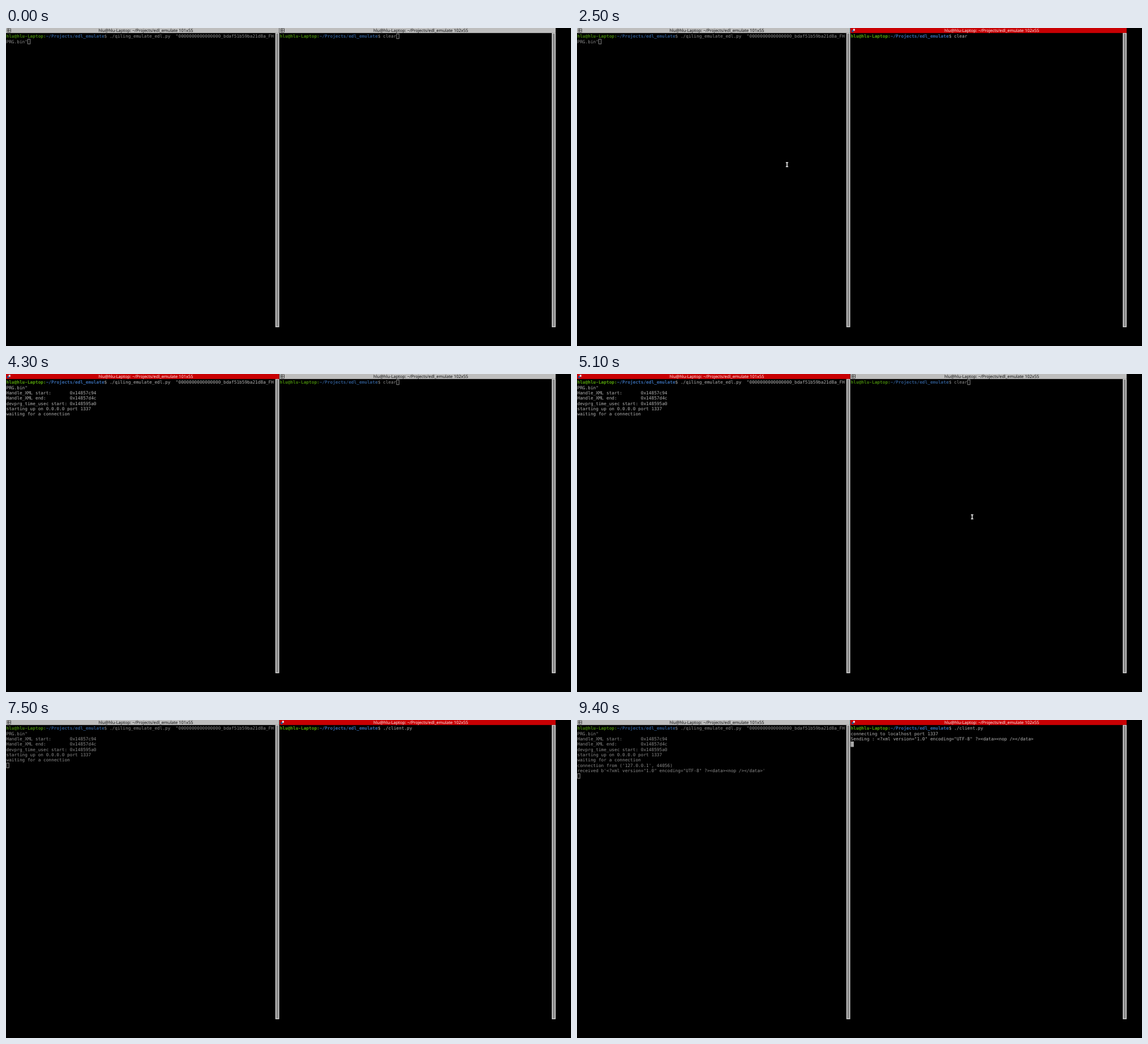
An HTML page for the animation above (10000 ms loop, 998x561 px).

```html
<!DOCTYPE html>
<html lang="en">
<head>
<meta charset="utf-8">
<title>Two terminals</title>
<style>
html, body { margin: 0; width: 100%; height: 100%; overflow: hidden; background: #000; }
/* The desktop is laid out at 1920 x 1080 and shown at 52 %. */
#desktop { position: absolute; left: 0; top: 0; width: 1920px; height: 1080px;
  transform: scale(.52); transform-origin: 0 0; text-rendering: geometricPrecision; }
.pane { position: absolute; top: 0; height: 1015px;
  --fg: #8c8c8c; --user: #43830a; --path: #2d568a; --bar: #bebebe; --title: #000; }
.pane.active { --fg: #b4b4b4; --user: #56a60a; --path: #386cb0; --bar: #c80003; --title: #fff; }
.bar { position: absolute; left: 0; right: 0; top: 0; height: 17px; background: var(--bar);
  color: var(--title); font: 14.4px/17px "Open Sans", "Noto Sans", sans-serif;
  text-align: center; white-space: pre; }
.bar span { position: relative; left: 11px; }
.bar svg { position: absolute; left: 3px; top: 1px; }
.pane .on, .pane.active .off { display: none; }
.pane.active .on { display: inline; }
pre { position: absolute; left: 1px; top: 19px; margin: 0; color: var(--fg);
  font: 14.95px/18px "DejaVu Sans Mono", monospace; }
b:first-child { color: var(--user); }
b + b { color: var(--path); }
.cursor { position: absolute; box-sizing: border-box; width: 10px; height: 18px;
  border: 2px solid #858585; }
.active .cursor { background: #aaa; border-color: #aaa; }
.scroll { position: absolute; right: 0; top: 17px; bottom: 0; width: 13px; background: #d2d2d2; }
.scroll::after { content: ""; position: absolute; left: 3px; right: 3px; top: 2px; bottom: 3px;
  background: #858585; }
#pointer { position: absolute; left: -6px; top: -9px; }
</style>
</head>
<body>
<div id="desktop">
  <svg id="pointer" width="12" height="18" viewBox="-6 -9 12 18" fill="none">
    <path d="M-4-7H4M-4 7H4M0-7V7" stroke="#444" stroke-width="4.5"/>
    <path d="M-4-7H4M-4 7H4M0-7V7" stroke="#fff" stroke-width="2.4"/>
  </svg>
</div>
<script>
const LOOP = 10000, CELL = 9, ROW = 18;
const USER = "hlu@hlu-Laptop", PATH = "~/Projects/edl_emulate";
const XML = '<?xml version="1.0" encoding="UTF-8" ?><data><nop /></data>';
const desktop = document.getElementById("desktop");
const pointer = document.getElementById("pointer");

const command = './qiling_emulate_edl.py  "0000000000000000_bdaf51b59ba21d8a_FH\nPRG.bin"';
const hooks = command + "\n" + [
  "Handle_XML start:       0x14857c94",
  "Handle_XML end:         0x14857d4c",
  "devprg_time_usec start: 0x148595a0", ""].join("\n");
const waiting = hooks + "starting up on 0.0.0.0 port 1337\nwaiting for a connection\n";
const connected = waiting + "connection from ('127.0.0.1', 44056)\n";
const client = "./client.py ";
const connecting = client + "\nconnecting to localhost port 1337\n";

// Each step lists only what changes; blink is the focused cursor's visibility.
const steps = [
  [0, { focus: "", blink: true, left: command, right: "clear" }],
  [300, { focus: "right" }],
  [900, { blink: false }],
  [1500, { blink: true }],
  [2100, { blink: false }],
  [2600, { focus: "left", blink: true }],
  [3300, { blink: false }],
  [3400, { blink: true, left: command + "\n" }],
  [3700, { left: hooks }],
  [3900, { left: waiting, blink: false }],
  [4500, { blink: true }],
  [5100, { blink: false }],
  [5500, { focus: "right", blink: true }],
  [6100, { blink: false }],
  [6700, { blink: true }],
  [6900, { right: client }],
  [7500, { blink: false }],
  [8100, { blink: true }],
  [8200, { right: connecting, left: connected }],
  [8300, { right: connecting + `Sending : ${XML}\n`, left: connected + `received b'${XML}'\n` }],
  [8800, { blink: false }],
  [9400, { blink: true }]
];

// Pointer centre in stage pixels; a step without a place hides it.
const pointerSteps = [
  [0], [1300, 734, 8], [1400, 520, 80], [1500, 250, 150], [1600, 117, 205], [1700, 371, 241],
  [3100, 383, 236], [3400],
  [4800, 392, 237], [4900, 500, 243], [5000, 650, 254], [5100, 698, 252], [6900]
];

function makePane(x, width, size) {
  const el = document.createElement("div");
  el.className = "pane";
  el.style.cssText = `left:${x}px;width:${width}px`;
  el.innerHTML = `<div class="bar"><svg width="14" height="14">
    <path class="off" d="M1 1H13V13H1ZM1 7H13M6 1V13" fill="#ddd" stroke="#222" stroke-width="1.8"/>
    <g class="on"><path d="M1 6H8V13H1Z" fill="#1c4f8c"/><path d="M6 2H12V8H6Z" fill="#e4ecf5"/></g>
    </svg><span>${USER}: ${PATH} ${size}</span></div>
    <pre><b>${USER}:</b><b>${PATH}</b><span></span><i class="cursor"></i></pre>
    <div class="scroll"></div>`;
  desktop.insertBefore(el, pointer);
  const text = el.querySelector("pre span"), cursor = el.querySelector(".cursor");
  return (output, active, blink) => {
    el.classList.toggle("active", active);
    text.textContent = "$ " + output;
    const lines = `${USER}:${PATH}$ ${output}`.split("\n");
    cursor.style.left = lines.at(-1).length * CELL + "px";
    cursor.style.top = (lines.length - 1) * ROW + "px";
    cursor.style.visibility = active && !blink ? "hidden" : "visible";
  };
}

const panes = { left: makePane(0, 928, "101x55"), right: makePane(929, 938, "102x55") };

let shown = "";
function draw() {
  const t = performance.now() % LOOP;
  const past = steps.filter(([at]) => at <= t);
  const [at, x, y] = pointerSteps.filter(([at]) => at <= t).at(-1);
  const key = past.length + ":" + at;
  if (key !== shown) {
    shown = key;
    const state = Object.assign({}, ...past.map(step => step[1]));
    for (const side in panes) panes[side](state[side], state.focus === side, state.blink);
    pointer.style.visibility = x === undefined ? "hidden" : "visible";
    if (x !== undefined) pointer.style.transform = `translate(${x / .52}px, ${y / .52}px)`;
  }
  requestAnimationFrame(draw);
}
draw();
</script>
</body>
</html>
```
